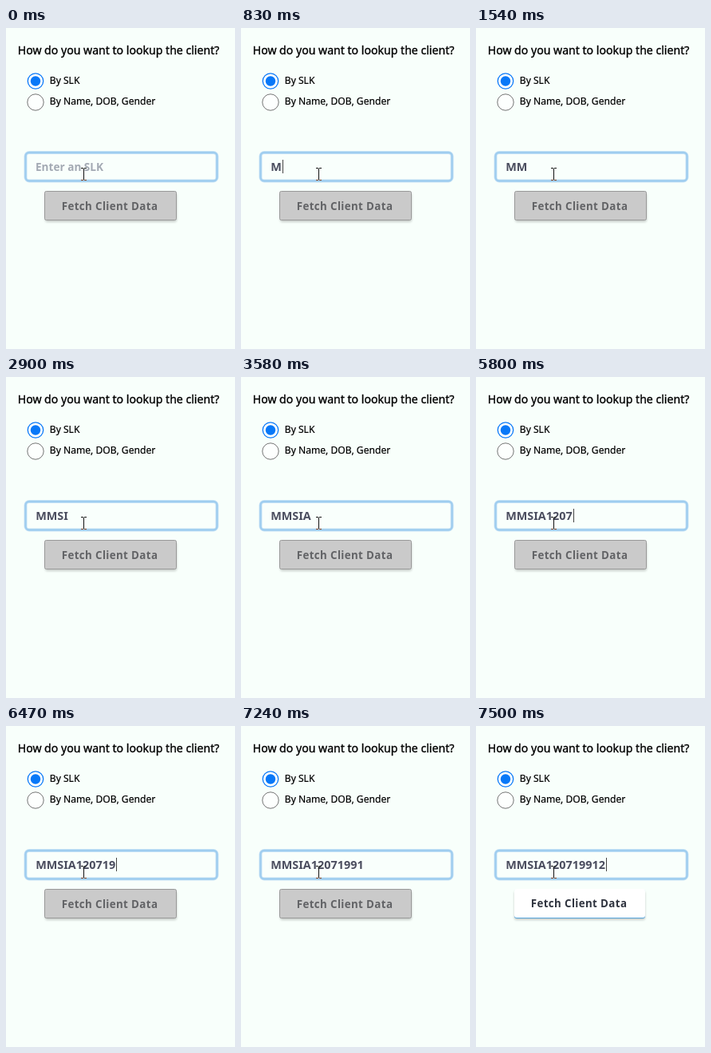
Animation of 287 by 402 pixels, one loop 8 s. Source, as an HTML page:

```html
<!DOCTYPE html>
<html lang="en">
<head>
<meta charset="utf-8">
<title>Client lookup</title>
<style>
  html, body { margin: 0; width: 100%; height: 100%; overflow: hidden; background: #f8fffb; }
  svg { display: block; font-family: "Noto Sans", "Open Sans", sans-serif; white-space: pre; }
  .label { font-size: 12.1px; fill: #000; stroke: #000; stroke-width: .2px; }
  .title { font-size: 14.1px; stroke-width: .35px; }
  .strong { font-weight: 600; }
  .button { font-size: 13.3px; letter-spacing: .38px; }
</style>
</head>
<body>
<svg width="287" height="402" viewBox="0 0 287 402">
  <defs>
    <filter id="soft" x="-10%" y="-20%" width="120%" height="150%"><feGaussianBlur stdDeviation="1.5"/></filter>
  </defs>
  <text class="label title" x="14.7" y="33">How do you want to lookup the client?</text>

  <circle cx="37" cy="66.5" r="9.7" fill="#fff" stroke="#0878f8" stroke-width="1.3"/>
  <circle cx="37" cy="66.5" r="6.2" fill="#0878f8"/>
  <text class="label" x="54.8" y="70">By SLK</text>
  <circle cx="37" cy="93" r="10.2" fill="#fdfffe" stroke="#747474"/>
  <text class="label" x="54.8" y="96">By Name, DOB, Gender</text>

  <rect x="24.5" y="156" width="240" height="35.5" rx="4.5" fill="#f9fffc" stroke="#c9e4f6" stroke-width="4"/>
  <rect x="24.5" y="156" width="240" height="35.5" rx="4.5" fill="none" stroke="#9fcdef" stroke-width="2.4"/>
  <rect id="selection" x="38" y="165" height="17" fill="#0078d7"/>
  <text id="hint" class="strong" x="37" y="179" font-size="13.6" fill="#a3a9b3">Enter an SLK</text>
  <text id="entry" class="strong" x="37.2" y="179" font-size="14.4"></text>
  <rect id="caret" y="165" width="1" height="17" fill="#444"/>

  <g id="disabled">
    <rect x="49" y="207" width="165" height="36" rx="3" fill="#000" opacity=".2" filter="url(#soft)"/>
    <rect x="48.5" y="204.5" width="165" height="36" rx="2" fill="#cacaca" stroke="#999"/>
    <text class="strong button" x="69.8" y="228" fill="#626366">Fetch Client Data</text>
  </g>
  <g id="enabled">
    <rect x="48" y="207" width="164" height="36" rx="3" fill="#000" opacity=".2" filter="url(#soft)"/>
    <rect x="48" y="205" width="164" height="36" rx="3" fill="#55a4dc"/>
    <rect x="48" y="204" width="164" height="36" rx="3" fill="#fff"/>
    <text class="strong button" x="68.8" y="227" fill="#30343f">Fetch Client Data</text>
  </g>

  <path d="M94 175.5h3m1 0h3M97.5 176v14" fill="none" stroke="#111"/>
  <path d="M94 190.5h3m1 0h3" stroke="#8a4b2a"/>
</svg>
<script>
  const LOOP = 8000, BLINK = 510, VALUE = "MMSIA120719912";
  const FOCUS = 540, SELECT = 3990;
  const keys = [830, 990, 1700, 2380, 3030, 4510, 4760, 5140, 5800, 6210, 6470, 6600, 6730, 7500];
  const get = id => document.getElementById(id);
  const show = (id, on) => get(id).setAttribute("visibility", on ? "visible" : "hidden");
  const entry = get("entry");

  function draw(t) {
    const count = keys.filter(key => key <= t).length;
    const lastInput = count ? keys[count - 1] : FOCUS;
    const selected = t >= SELECT && lastInput < SELECT;
    // The caret restarts its blink with every key.
    const lit = t >= FOCUS && !selected && (t - lastInput) % (2 * BLINK) < BLINK;
    const ready = count === VALUE.length;

    entry.textContent = VALUE.slice(0, count);
    entry.setAttribute("fill", selected ? "#fff" : "#4b4d5f");
    const end = Math.round(38.4 + (count && entry.getComputedTextLength()));
    get("caret").setAttribute("x", end);
    get("selection").setAttribute("width", end - 37);
    show("caret", lit);
    show("hint", !count);
    show("selection", selected);
    show("disabled", !ready);
    show("enabled", ready);
  }

  const start = performance.now();
  function tick() {
    draw((performance.now() - start) % LOOP);
    requestAnimationFrame(tick);
  }
  tick();
</script>
</body>
</html>
```
